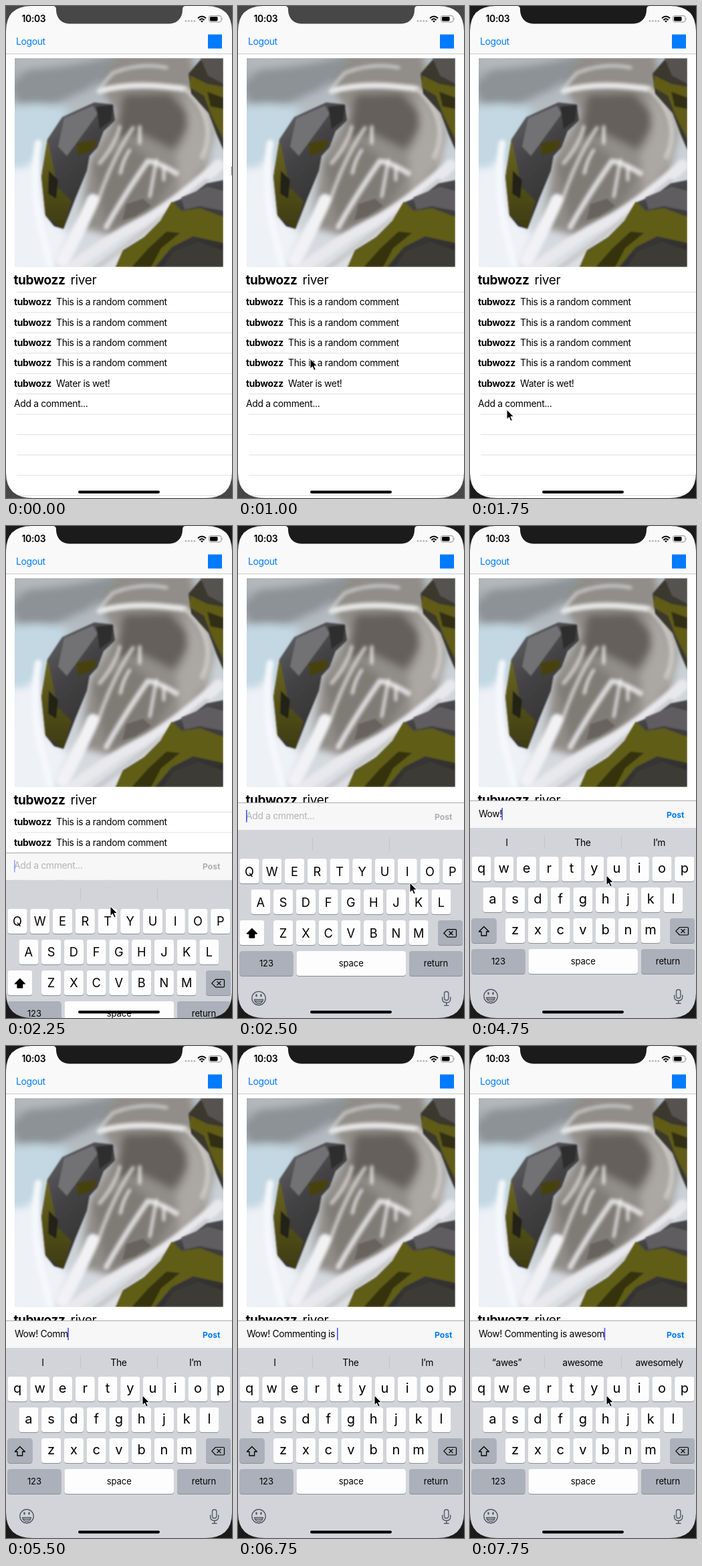
An HTML page that plays this animation: 338 px wide and 735 px high, repeating every 8 s.

```html
<!DOCTYPE html>
<html lang="en">
<head>
<meta charset="utf-8">
<title>Comment typing</title>
<style>
html, body { margin: 0; width: 100%; height: 100%; overflow: hidden; background: #fff; }
svg { display: block; width: 338px; height: 735px; }
text { font-family: Inter, Roboto, sans-serif; font-size: 13.88px; letter-spacing: -.32px; white-space: pre; fill: #000; }
.b { font-weight: 700; }
.mid { text-anchor: middle; }
.title { font-size: 19px; letter-spacing: -.35px; }
.key { font-size: 18.4px; letter-spacing: 0; text-anchor: middle; }
.small { font-size: 13px; letter-spacing: -.1px; text-anchor: middle; }
#typed { letter-spacing: -.36px; }
</style>
</head>
<body>
<svg id="stage" viewBox="0 0 338 735" xmlns="http://www.w3.org/2000/svg">
  <defs>
    <clipPath id="frame"><rect x="13" y="78" width="312" height="312"/></clipPath>
    <filter id="soft" x="-30%" y="-30%" width="160%" height="160%"><feGaussianBlur stdDeviation="6"/></filter>
    <filter id="mist" x="-30%" y="-30%" width="160%" height="160%"><feGaussianBlur stdDeviation="2.4"/></filter>
    <filter id="edge" x="-10%" y="-10%" width="120%" height="120%"><feGaussianBlur stdDeviation=".8"/></filter>
    <linearGradient id="river" x1="0" y1="0" x2=".35" y2="1">
      <stop offset="0" stop-color="#a3a9ad"/><stop offset=".4" stop-color="#b9c2c8"/><stop offset="1" stop-color="#dcdfe4"/>
    </linearGradient>
    <linearGradient id="rock" x1="0" y1="0" x2=".5" y2="1">
      <stop offset="0" stop-color="#6b6b6d"/><stop offset=".45" stop-color="#454446"/><stop offset="1" stop-color="#302f2d"/>
    </linearGradient>
    <linearGradient id="moss" x1="0" y1="0" x2="0" y2="1">
      <stop offset="0" stop-color="#6c6720"/><stop offset="1" stop-color="#3d3a10"/>
    </linearGradient>
  </defs>

  <rect width="338" height="735" fill="#fff"/>
  <rect width="338" height="71" fill="#f9f9f9"/>
  <rect y="71" width="338" height="1" fill="#c9c9cb"/>
  <text x="23.5" y="24" font-weight="600">10:03</text>
  <g fill="#b9b9bb"><circle cx="269" cy="22.5" r="1.4"/><circle cx="273.3" cy="22.5" r="1.4"/><circle cx="277.6" cy="22.5" r="1.4"/><circle cx="281.9" cy="22.5" r="1.4"/></g>
  <g fill="none" stroke="#000" stroke-width="2">
    <path d="M287 18.2Q293 12.7 299 18.2M289.4 21Q293 17.6 296.6 21"/>
    <path d="M293 24.6l-2-2.1q2-1.6 4 0z" fill="#000" stroke="none"/>
    <rect x="303.5" y="14.5" width="18.5" height="9.5" rx="2.8" stroke="#929294" stroke-width="1"/>
    <rect x="305" y="16" width="11.5" height="6.5" rx="1.4" fill="#000" stroke="none"/>
    <path d="M323.4 17.6q1.6 1.6 0 3.4z" fill="#929294" stroke="none"/>
  </g>
  <text x="15" y="58" style="fill:#007aff">Logout</text>
  <rect x="302" y="42.5" width="21" height="21" fill="#007aff"/>

  <g clip-path="url(#frame)">
    <rect x="13" y="78" width="312" height="312" fill="url(#river)"/>
    <g filter="url(#soft)">
      <path d="M60 70L210 70L120 125L30 165L5 120Z" fill="#8d9296"/>
      <path d="M10 95Q80 95 170 72L10 72Z" fill="#b3b8bb"/>
      <path d="M5 150Q60 140 95 155L55 230L35 330L5 360Z" fill="#c3d8e3"/>
      <path d="M5 240Q35 250 48 220L58 310L95 340L70 400L5 400Z" fill="#eef1f6"/>
      <path d="M170 70L275 70L290 130L310 190L300 250L240 300L165 345L110 330L125 230L165 160L140 120Z" fill="#918d88"/>
      <path d="M175 132L245 130L280 170L250 215L200 190L165 200Z" fill="#66615c"/>
      <path d="M130 235L185 205L250 255L215 320L150 330Z" fill="#7f7b76"/>
      <path d="M262 125Q315 170 300 235L260 285L255 220Q285 190 262 125Z" fill="#aba7a2"/>
    </g>
    <g fill="none" stroke-linecap="round" filter="url(#mist)">
      <path d="M140 127Q190 112 268 124" stroke="#e6e7e7" stroke-width="9"/>
      <path d="M140 122L160 100Q200 84 240 92" stroke="#c6c8c8" stroke-width="5"/>
      <path d="M270 125Q318 170 294 225" stroke="#c9c6c2" stroke-width="8"/>
      <path d="M255 250Q225 232 212 232Q175 285 150 330" stroke="#dddcdd" stroke-width="8"/>
      <path d="M190 182Q160 225 138 290M170 180Q165 205 140 235" stroke="#d2d0cf" stroke-width="5"/>
      <path d="M318 238Q250 300 200 325T85 402" stroke="#e9e9ed" stroke-width="17"/>
      <path d="M300 262Q225 325 130 395" stroke="#c9c9cc" stroke-width="8"/>
      <path d="M130 290Q115 325 85 380" stroke="#f2f2f5" stroke-width="19"/>
      <path d="M185 215Q175 230 171 250M236 240V260M200 180V205M225 230L215 285" stroke="#edecec" stroke-width="4"/>
      <path d="M48 205Q38 270 52 330L65 385" stroke="#f6f8fb" stroke-width="10"/>
    </g>
    <g filter="url(#edge)">
      <path d="M62 199L84 166L112 153L132 144L160 147L163 171L146 187L137 211L125 224L121 246L104 287L86 333L72 329L59 313L53 255Z" fill="url(#rock)"/>
      <path d="M87 168L130 149L137 161L105 205L91 224L78 210Z" fill="#727274"/>
      <path d="M135 150L160 148L157 171L140 184Z" fill="#2e2d2e"/>
      <path d="M62 199L70 235L76 270L98 291L86 333L59 313L53 255Z" fill="url(#moss)"/>
      <path d="M105 205L135 199L132 213L108 225Z" fill="#47430f"/>
      <path d="M64 246L78 260L75 288L63 280Z" fill="#242315"/>
      <path d="M273 101L293 78H325V215L315 192L303 160L277 131Z" fill="#3b392d"/>
      <path d="M276 104L300 116L325 121V198L308 165L296 134L275 122Z" fill="#615b19"/>
      <path d="M291 78H325V116L302 104Z" fill="#555250"/>
      <path d="M301 128L325 137V154L306 150Z" fill="#332f12"/>
      <path d="M164 390L175 365L207 345L231 321L247 294L279 281L300 265L325 260V390Z" fill="url(#rock)"/>
      <path d="M164 390L174 367L207 345L231 321L248 292L263 306L290 302L325 315V354L280 344L248 360L223 390Z" fill="#605d17"/>
      <path d="M212 363L240 337L260 339L232 362L217 390H188Z" fill="#353310"/>
      <path d="M262 286L301 270L325 276V306L290 299L267 304Z" fill="#5f5d5e"/>
      <path d="M250 367L288 352L325 365V390H235Z" fill="#3c3a35"/>
      <path d="M180 296L205 288L217 299L193 314L174 320Z" fill="#69645f"/>
    </g>
  </g>

  <g id="table"></g>

  <g id="panel">
    <rect y="410" width="338" height="41" fill="#f7f7f8"/>
    <rect y="410" width="338" height="1" fill="#a9a9ac"/>
    <text id="typed" x="13" y="434.5"></text>
    <text id="hint" x="12" y="434.5" style="fill:#b4b4b7">Add a cmment...</text>
    <rect id="caret" y="421" width="1.6" height="18.5" fill="#4653ef"/>
    <text id="post" x="294" y="435.5" class="b" style="font-size:12.2px;letter-spacing:0">Post</text>
    <rect y="451" width="338" height="290" fill="#d2d4d9"/>
    <path d="M111.5 463V482M226.5 463V482" stroke="#c1c4ca"/>
    <g id="tips"></g>
    <g id="keys"></g>
    <path id="shift" d="M20.8 598.5L28.3 606H24.6V612H17V606H13.3Z" stroke="#000" stroke-width="1.3" stroke-linejoin="round"/>
    <path d="M313.5 599.5H325Q326.5 599.5 326.5 601V609.5Q326.5 611 325 611H313.5L307.8 605.2ZM315.5 602.2l6 6m0-6l-6 6" fill="none" stroke="#000" stroke-width="1.2" stroke-linejoin="round"/>
    <g fill="none" stroke="#54585f" stroke-width="1.4" stroke-linecap="round">
      <circle cx="31" cy="702.5" r="10.2"/>
      <path d="M24.6 704.5H37.4Q36.5 710 31 710T24.6 704.5ZM25.5 707H36.5"/>
      <path d="M27.5 697.5v1.6M34.5 697.5v1.6" stroke-width="2.4"/>
      <rect x="308.5" y="692.5" width="6.4" height="13" rx="3.2"/>
      <path d="M305.6 701V703.5Q305.6 709 311.7 709T317.8 703.5V701M311.7 709V713.3M308.5 713.3H315"/>
    </g>
  </g>

  <rect x="108" y="724" width="122" height="4.2" rx="2.1" fill="#000"/>
  <path id="bezel" fill-rule="evenodd" d="M0 0H338V735H0ZM38 0Q0 0 0 38V697Q0 735 40 735H298Q338 735 338 697V38Q338 0 300 0H269Q264 0 264 5C264 18 256 26.500 243 26.500H96C83 26.500 75 18 75 5Q75 0 70 0Z"/>
  <path id="mouse" d="M0 0V14.500L3.400 11.400L5.800 17L8.300 16L5.900 10.500H10.500Z" fill="#000" stroke="#fff" stroke-width="1"/>
</svg>
<script>
const LOOP = 8000, STEP = 250;
const $ = id => document.getElementById(id);

function add(parent, tag, attrs, label) {
  const el = document.createElementNS("http://www.w3.org/2000/svg", tag);
  for (const k in attrs) el.setAttribute(k, attrs[k]);
  if (label) el.textContent = label;
  return parent.appendChild(el);
}
const write = (parent, x, y, label, cls) => add(parent, "text", { x, y, class: cls || "" }, label);

// Comment table
const user = "tubwozz", table = $("table"), ROW = 30.4;
write(table, 11.5, 415.5, user, "b title");
write(table, 96.5, 415.5, "river", "title");
for (let i = 0; i < 11; i++) {
  add(table, "rect", { x: 16, y: 427 + i * ROW, width: 322, height: 1, fill: "#dedee0" });
  const y = 447.2 + i * ROW;
  if (i < 5) {
    write(table, 12, y, user, "b");
    write(table, 75, y, i < 4 ? "This is a random comment" : "Water is wet!");
  } else if (i === 5) write(table, 12, y, "Add a comment...");
}

// Keyboard
const keys = $("keys"), letters = [];
function cap(x, y, width, fill) {
  add(keys, "rect", { x, y: y + 1, width, height: 37, rx: 4, fill: "#8b8e94" });
  return add(keys, "rect", { x, y, width, height: 37, rx: 4, fill });
}
["qwertyuiop", "asdfghjkl", "zxcvbnm"].forEach((row, r) => {
  [...row].forEach((ch, i) => {
    const x = [17, 33.9, 67.6][r] + i * 33.75, y = 494 + r * 46;
    cap(x - 14.6, y, 29.2, "#fdfdfd");
    letters.push({ ch, y, el: write(keys, x, y, "", "key") });
  });
});
const GRAY = "#abb0ba";
const shiftCap = cap(2.4, 586, 37, GRAY);
cap(299, 586, 37, GRAY);
[[2.4, 80, "123", GRAY], [87.5, 163.5, "space", "#fdfdfd"], [256, 80, "return", GRAY]].forEach(([x, w, label, fill]) => {
  cap(x, 632, w, fill);
  write(keys, x + w / 2, 654.7, label, "small");
});
const tips = [55, 168.5, 283].map(x => write($("tips"), x, 478, "", "mid"));

// Characters entered, one entry per step from TYPE on
const PHRASE = "Wow! Commenting is awesom", TYPE = 4000;
const counts = [1, 2, 3, 4, 5, 7, 9, 11, 12, 15, 17, 19, 20, 22, 23, 25];

const path = [[500, 267, 300], [1500, 55, 603], [2000, 55, 603], [2500, 257, 533], [3000, 204, 522]];
function mouseAt(t) {
  if (t < 500) return [337, 239];
  for (let i = 1; i < path.length; i++) {
    const [t0, x0, y0] = path[i - 1], [t1, x1, y1] = path[i];
    if (t < t1) {
      const u = (t - t0) / (t1 - t0), e = i === 1 ? u * (2 - u) : u;
      return [x0 + (x1 - x0) * e, y0 + (y1 - y0) * e];
    }
  }
  return path[path.length - 1].slice(1);
}

function draw(t) {
  const n = t < TYPE ? 0 : counts[(t - TYPE) / STEP];
  const upper = n === 0 || n === 5;

  $("bezel").setAttribute("fill", t < 1750 ? "#474747" : "#1b1b1b");
  $("mouse").setAttribute("transform", `translate(${mouseAt(t)})`);

  const lift = t < 2750 ? 325 * Math.exp((2140 - t) / 77) : 0;
  $("panel").style.display = t < 2250 ? "none" : "";
  $("panel").setAttribute("transform", `translate(0 ${lift})`);

  const typed = $("typed");
  typed.textContent = PHRASE.slice(0, n);
  $("hint").style.display = n ? "none" : "";
  $("post").style.fill = n ? "#007aff" : "#aeaeb1";
  const caret = $("caret");
  caret.setAttribute("x", n ? 13 + typed.getComputedTextLength() - .6 : 12);
  caret.setAttribute("opacity", n ? 1 : .5 + .5 * Math.cos((t - 2500) * Math.PI / 500));

  const words = t >= 7500 ? ["“awes”", "awesome", "awesomely"] : n ? ["I", "The", "I’m"] : ["", "", ""];
  tips.forEach((el, i) => el.textContent = words[i]);

  letters.forEach(({ ch, y, el }) => {
    el.textContent = upper ? ch.toUpperCase() : ch;
    el.setAttribute("y", y + (upper ? 25.6 : 24.4));
    el.style.fontSize = upper ? "18.2px" : "20px";
  });
  shiftCap.setAttribute("fill", upper ? "#fdfdfd" : GRAY);
  $("shift").setAttribute("fill", upper ? "#000" : "none");
}

let start, last = -1;
function tick(now) {
  if (start === undefined) start = now;
  const t = Math.floor((now - start) % LOOP / STEP) * STEP;
  if (t !== last) draw(last = t);
  requestAnimationFrame(tick);
}
draw(0);
requestAnimationFrame(tick);
</script>
</body>
</html>
```
